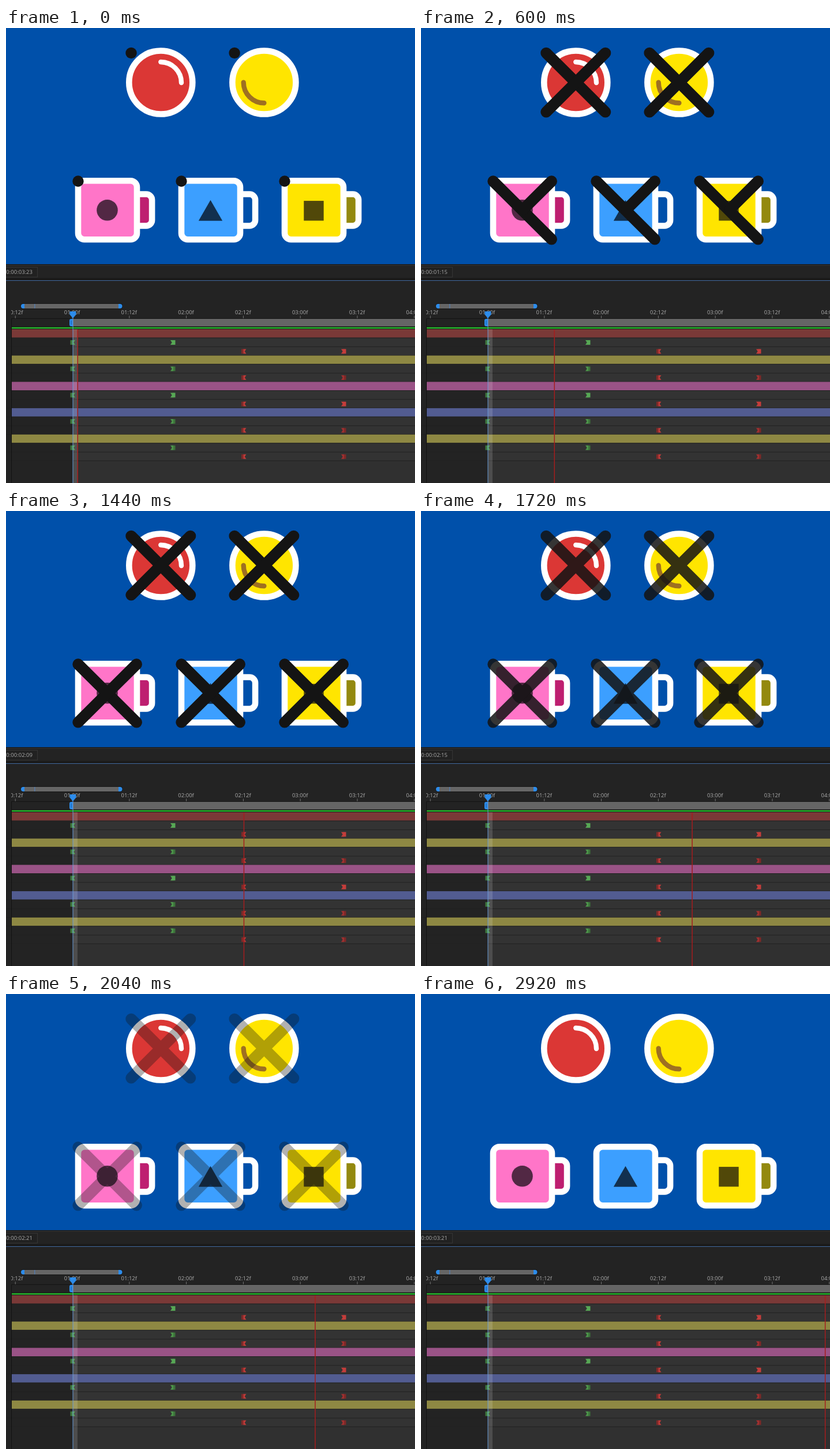
Write an HTML page that moves like this. It is 709 px wide and 790 px high and loops after 2960 ms.

```html
<!DOCTYPE html>
<html lang="en">
<head>
<meta charset="utf-8">
<title>Crossed-out mugs</title>
<style>
  html, body { margin: 0; width: 100%; height: 100%; overflow: hidden; background: #232323; }
  svg { display: block; width: 709px; height: 790px; }
  text { font: 9.5px "Noto Sans", "Open Sans", sans-serif; fill: #a2a2a2; }
  .cross { fill: none; stroke: #141414; stroke-width: 19.4; stroke-linecap: round; }
</style>
</head>
<body>
<svg id="stage" viewBox="0 0 709 790" xmlns="http://www.w3.org/2000/svg">
  <defs>
    <clipPath id="rulerClip"><rect x="9" y="486" width="700" height="20"/></clipPath>
  </defs>
  <rect width="709" height="410" fill="#0050aa"/>
  <g id="art"></g>
  <g id="panel"></g>
</svg>
<script>
const NS = "http://www.w3.org/2000/svg";
const art = document.getElementById("art");
const panel = document.getElementById("panel");

function add(parent, tag, attrs, text) {
  const el = document.createElementNS(NS, tag);
  for (const k in attrs) el.setAttribute(k, attrs[k]);
  if (text) el.textContent = text;
  parent.append(el);
  return el;
}
const box = (x, y, width, height, fill, more) =>
  add(panel, "rect", { x, y, width, height, fill, ...more });
const shape = (d, fill) => add(panel, "path", { d, fill });

// Artwork
const crosses = [];
function cross(x1, y1, x2, y2, gain) {
  const g = add(art, "g", { class: "cross" });
  const lines = [[x1, y1, x2, y2], [x2, y1, x1, y2]].map(([ax, ay, bx, by]) => ({
    el: add(g, "line", { x1: ax, y1: ay, x2: ax, y2: ay }), ax, ay, bx, by
  }));
  crosses.push({ g, lines, gain });
}

function button(cx, fill, arc, arcColor) {
  add(art, "circle", { cx, cy: 94.5, r: 55, fill, stroke: "#fff", "stroke-width": 10.6 });
  add(art, "path", {
    d: arc, fill: "none", stroke: arcColor, "stroke-width": 8.4, "stroke-linecap": "round"
  });
  cross(cx - 51.3, 43.4, cx + 51.3, 145.8, 1.36);
}

function mug(x, fill, hole, icon, iconColor) {
  add(art, "rect", {
    x: x + 100, y: 288.5, width: 33.4, height: 55, rx: 10,
    fill: hole, stroke: "#fff", "stroke-width": 10.6
  });
  add(art, "rect", {
    x: x + 5.3, y: 265.3, width: 102, height: 102, rx: 11,
    fill, stroke: "#fff", "stroke-width": 10.6
  });
  add(art, icon.tag, { ...icon.attrs, fill: iconColor, transform: `translate(${x + 55.8} 316.3)` });
  cross(x + 5.3, 266, x + 106.6, 366.8, 1);
}

button(268.3, "#db3735", "M268.3 59A36 36 0 0 1 304 95", "#fff");
button(447.4, "#ffe500", "M411.7 94.5A36 36 0 0 0 447.4 130.3", "#9e7021");
mug(119.7, "#ff75c8", "#be1f70", { tag: "circle", attrs: { r: 18.3 } }, "#522844");
mug(298.7, "#3c9fff", "#0050aa", { tag: "path", attrs: { d: "M0 -17.5L20.7 18.4H-20.7Z" } }, "#12304f");
mug(477.7, "#ffe500", "#93890f",
  { tag: "rect", attrs: { x: -17.2, y: -16.2, width: 34.4, height: 34.4 } }, "#514809");

// Header, zoom bar and ruler
const X0 = 116, STEP = 8.235;
box(0, 410, 709, 380, "#232323");
box(0, 410, 709, 1, "#181818");
box(0, 411, 709, 2, "#2b2b2b");
box(-2, 415.5, 56.5, 17, "#212121", { stroke: "#353535" });
box(0, 434, 709, 4, "#1a1a1a");
box(0, 438, 709, 1, "#41699f");
const clock = add(panel, "text", { x: 46, y: 427.3, "text-anchor": "end" });

box(26, 478, 176, 10, "#161616", { rx: 4 });
box(32, 479, 163, 8, "#666");
box(49, 479, 1.5, 8, "#5479a8");
shape("M32 479H30a4 4 0 0 0 0 8H32Z", "#2d8ceb");
shape("M195 479H197.500a4 4 0 0 1 0 8H195Z", "#2d8ceb");

const ruler = add(panel, "g", { "clip-path": "url(#rulerClip)" });
["00:12f", "01:00f", "01:12f", "02:00f", "02:12f", "03:00f", "03:12f", "04:00f"].forEach((label, i) => {
  const x = 16.2 + i * 98.8;
  add(ruler, "text", { x: x - 0.5, y: 497.2, "text-anchor": "middle" }, label);
  add(ruler, "rect", { x: x - 0.5, y: 499.5, width: 1, height: 5, fill: "#777" });
});
box(9, 504, 700, 1, "#141414");
box(116, 505, 593, 13, "#656565");
shape("M116 505H113a3 3 0 0 0 -3 3V515a3 3 0 0 0 3 3H116Z", "#2d8ceb");
box(112.5, 508, 1, 7, "#1a5da6");
box(9, 518, 700, 1.5, "#161616");
box(9, 519.5, 700, 2.5, "#25b52b");
box(9, 522, 700, 1, "#181818");

// Layer rows
box(116, 523, 593, 267, "#333");
const bars = ["#7a3937", "#8e8843", "#9a5386", "#525c91", "#8e8843"];
const ROW = 45.7;
bars.forEach((color, i) => {
  const y = 523 + i * ROW;
  box(9, y, 700, 14.6, color);
  [14.6, 30, 45].forEach(dy => box(0, y + dy, 709, 1, "#212121"));
});
box(116, 752, 593, 38, "#303030");
box(116, 523, 8, 267, "#fff", { opacity: 0.14 });
box(9, 505, 1, 285, "#111");

function key(x, y, ends, dark, light) {
  const s = ends ? -1 : 1;
  const at = (dx, dy) => `${x + s * dx} ${y + dy}`;
  shape(`M${at(-4.5, -4)}L${at(0, -4)}L${at(0, 4)}L${at(-4.5, 4)}Z`, dark);
  shape(`M${at(-1, -4)}L${at(4, -4)}L${at(1.3, 0)}L${at(4, 4)}L${at(-1, 4)}Z`, light);
}
bars.forEach((_, i) => {
  const y = 546 + i * ROW, bright = i === 0 || i === 2;
  key(116, y, false, "#3f783e", "#58a556");
  key(289, y, true, bright ? "#57a855" : "#3d743b", bright ? "#57a855" : "#4d954b");
  key(412.5, y + 15.4, false, "#7d2928", "#bd3b39");
  key(585, y + 15.4, true, bright ? "#c43d3b" : "#7d2928", bright ? "#c43d3b" : "#a03030");
});

box(115.5, 500, 1, 290, "#679ad8");
shape("M110.500 492H121.500V497.500L116 504L110.500 497.500Z", "#2d8ceb");
const head = box(0, 524, 1.5, 266, "#a51d1e");

// Timing: screen ticks against composition frames
const LOOP = 2960, TICK = 40;
const ticks = [0, 15, 28, 43, 51, 58, 73];
const headAt = [1, 14, 29, 43, 51, 57, 71];
const viewAt = [0, 14, 27, 41, 49, 56, 71];

function lookup(values, tick) {
  let i = 0;
  while (i < ticks.length - 2 && tick >= ticks[i + 1]) i++;
  const f = (tick - ticks[i]) / (ticks[i + 1] - ticks[i]);
  return Math.round(values[i] + (values[i + 1] - values[i]) * f);
}
const clamp = v => Math.min(1, Math.max(0, v));
const ease = v => { const p = clamp(v); return p * p * (3 - 2 * p); };
const pad = n => String(n).padStart(2, "0");

function timecode(tick) {
  const n = 1 + 0.97 * tick;
  const shown = n < 3 ? 71 : 3 + 6 * Math.floor((n - 3) / 6);
  return `0:00:${pad(1 + Math.floor(shown / 24))}:${pad(shown % 24)}`;
}

function draw(ms) {
  const tick = Math.floor((ms % LOOP) / TICK);
  const view = lookup(viewAt, tick);
  const drawn = ease(view / 21);
  const opacity = 1 - ease((view - 36) / 21);
  for (const { g, lines, gain } of crosses) {
    const length = 2 * clamp(drawn * gain);
    g.setAttribute("opacity", opacity);
    lines.forEach(({ el, ax, ay, bx, by }, i) => {
      const p = clamp(length - i);
      el.setAttribute("x2", ax + (bx - ax) * p);
      el.setAttribute("y2", ay + (by - ay) * p);
      el.setAttribute("visibility", i && !p ? "hidden" : "visible");
    });
  }
  head.setAttribute("x", X0 + STEP * lookup(headAt, tick) - 0.75);
  clock.textContent = timecode(tick);
}

const start = performance.now();
function loop(now) {
  draw(Math.max(0, now - start));
  requestAnimationFrame(loop);
}
draw(0);
requestAnimationFrame(loop);
</script>
</body>
</html>
```
